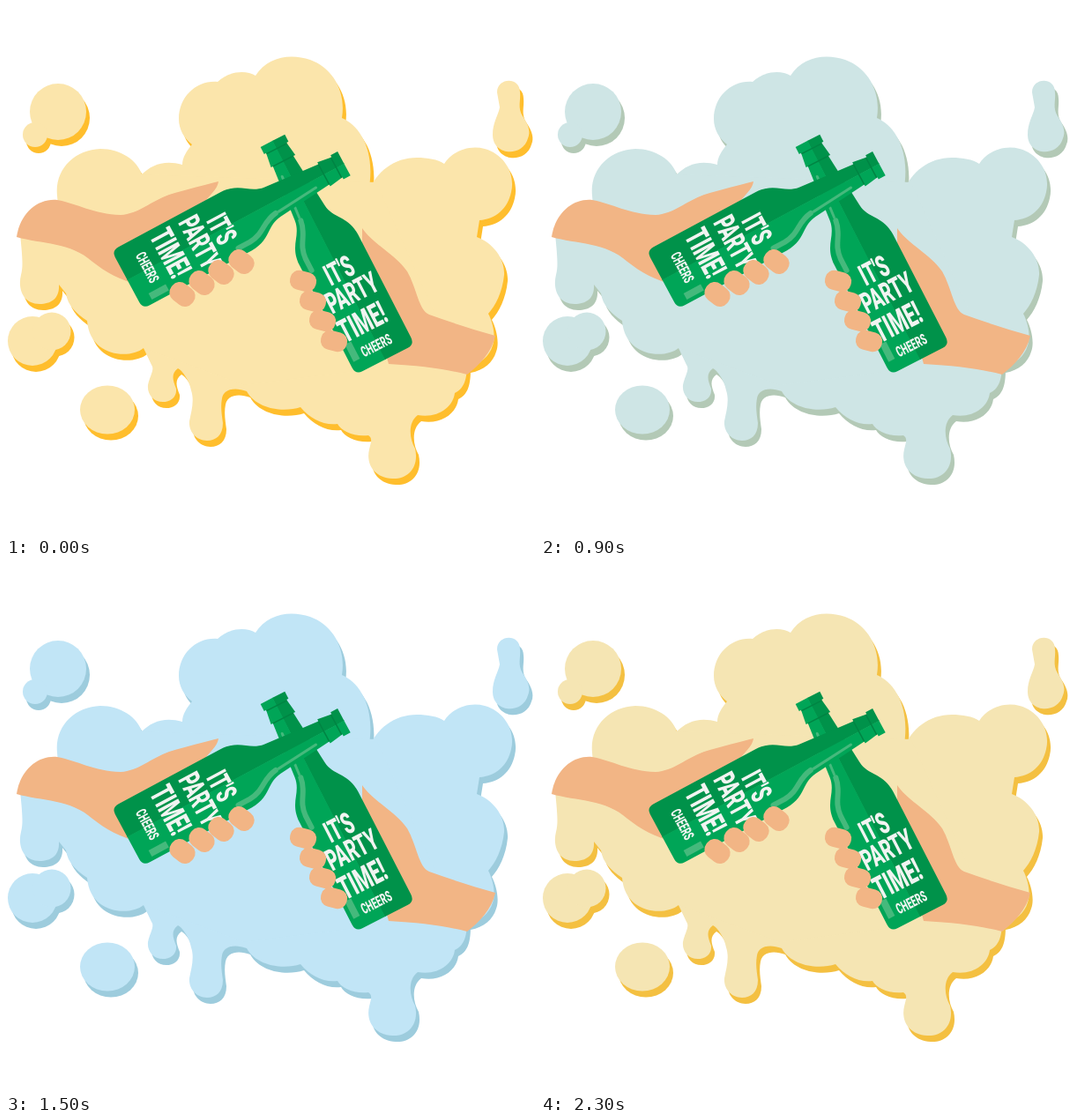
Recreate the animation shown at these times as an HTML page. Size 600 px wide and 600 px high, loop 2400 ms.

```html
<!DOCTYPE html>
<html lang="en">
<head>
<meta charset="utf-8">
<title>Party time</title>
<style>
  html, body { margin: 0; width: 100%; height: 100%; overflow: hidden; background: #fff; }
  svg { display: block; width: 100%; height: 100%; }
  .label { font-family: Roboto, "Liberation Sans", sans-serif; font-weight: 900; fill: #f1f4f1; }
  .skin { fill: #f2b585; }
</style>
</head>
<body>
<svg viewBox="0 0 600 600">
  <defs>
    <g id="foam">
      <path d="M196 128C196 103 216 84 240 86C252 74 272 72 283 79C296 58 322 53 345 61
        C370 70 386 96 381 127C402 136 420 165 411 211C420 188 440 172 466 172C478 172 490 174 497 179
        C506 165 525 157 543 162C565 168 578 190 573 211C569 230 555 242 537 243L534 262
        C553 269 566 287 565 305C563 325 555 340 547 349C552 358 556 375 552 385
        C548 398 538 406 523 409L300 320L154 191C165 180 180 174 200 180
        C200 172 205 164 211 157C202 150 196 140 196 128Z"/>
      <path d="M523 405C523 425 519 434 509 439C507 455 490 468 467 464C456 472 457 490 464 502
        C469 524 455 537 438 536C418 535 408 520 412 503C414 495 416 490 411 487
        C395 489 380 482 376 474C360 476 345 468 334 455C315 461 285 458 273 437
        C260 432 247 434 245 445C243 455 245 465 246 473C246 487 238 493 228 493
        C216 493 207 483 208 471C210 460 214 448 210 436C208 425 200 413 195 411
        C187 417 189 424 193 434C194 444 186 449 178 449C167 449 160 440 161 430
        C163 420 169 412 165 407L156 388L300 250Z"/>
      <path d="M156 388C140 401 95 398 92 357C80 349 70 340 68 326L60 316
        C61 331 52 338 38 338C20 338 13 322 17 305C20 295 18 280 16 258L60 238L58 215
        C55 185 78 163 107 162C130 162 149 175 154 191L420 200L510 400L270 430Z"/>
      <circle cx="59" cy="120" r="32"/><circle cx="33" cy="146" r="14"/>
      <path d="M557 98C557 81 583 80 583 98C584 108 580 115 586 125C593 135 595 143 592 150
        C586 172 552 170 552 146C552 132 558 125 560 115Z"/>
      <circle cx="30" cy="380" r="28"/><circle cx="52" cy="369" r="21.5"/>
      <ellipse cx="115" cy="458" rx="31" ry="27.5"/>
    </g>
    <path id="half" d="M0 0H29Q37.5 0 37.5 -9V-140C37 -165 21 -168 19 -187L13 -253H15.5L13 -270H15.5V-279H0Z"/>
    <g id="glass">
      <use href="#half" fill="#00a557" transform="scale(-1 1)"/>
      <path d="M-.5 0H1V-279H-.5Z" fill="#00a557"/>
      <use href="#half" fill="#00924a"/>
      <path d="M-13 -269H13M-13 -253H13" stroke="#008443" stroke-width="1.5"/>
      <g fill="none" stroke="#45b97c" stroke-linecap="round">
        <path d="M-28 -128V-143C-27 -162 -15 -166 -13 -184" stroke-width="6"/>
        <path d="M-13 -188L-9 -238" stroke-width="3"/>
        <path d="M-29 -14V-36" stroke-width="8" stroke-linecap="butt"/>
      </g>
    </g>
  </defs>

  <use id="shade" href="#foam" x="4" y="7"/>
  <use id="light" href="#foam"/>

  <path class="skin" d="M12 262C16 236 35 218 58 220C80 224 100 236 130 237C150 236 165 221 185 214
    C205 208 225 203 241 199C240 208 230 215 226 222L150 316C130 311 113 302 98 290C74 268 40 270 12 262Z"/>
  <path class="skin" d="M404 252C416 270 440 280 455 301C466 320 468 345 480 350C505 359 530 367 555 374
    C551 393 537 407 523 418C495 411 470 408 434 406L404 300Z"/>
  <g id="bottles"></g>
  <g id="fingers" class="skin"></g>
</svg>
<script>
  const $ = id => document.getElementById(id);

  const words = [["IT'S", -17, -102, 34], ["PARTY", -30, -73, 34], ["TIME!", -32, -37, 37], ["CHEERS", -20, -13, 17]];

  function bottle(x, y, angle, flip, lift) {
    const lines = words.map(([word, wx, wy, size]) =>
      `<text class="label" font-size="${size}" transform="translate(${wx} ${wy - lift}) scale(.58 1)">${word}</text>`);
    return `<g transform="translate(${x} ${y}) rotate(${angle})">
      <use href="#glass" transform="scale(${flip} 1)"/>${lines.join("")}</g>`;
  }

  function finger(x, y, w, h, angle) {
    return `<rect x="${-w / 2}" y="${-h / 2}" width="${w}" height="${h}" rx="${h / 2 - 1}"
      transform="translate(${x} ${y}) rotate(${angle})"/>`;
  }

  $("bottles").innerHTML = bottle(430, 401, -27.2, 1, 0) + bottle(137.5, 310.5, 61.8, -1, 8);

  const leftTips = [[267, 290], [244, 302], [222, 314], [200, 327]];
  const rightTips = [[337, 312], [348, 335], [359, 357], [372, 380]];
  $("fingers").innerHTML =
    leftTips.map(([x, y]) => finger(x, y, 30, 23, 38)).join("") +
    rightTips.map(([x, y]) => finger(x, y, 30, 22, 14)).join("");

  const mix = (a, b, k) => `rgb(${a.map((v, i) => Math.round(v + (b[i] - v) * k))})`;
  const beer = { light: [251, 229, 171], shade: [255, 190, 45] };
  const ice = { light: [186, 229, 254], shade: [146, 206, 240] };

  // Tenths of the fade, one step per 100 ms, with a 300 ms hold at each end.
  function blend(ms) {
    const step = Math.floor((ms % 2400) / 100);
    if (step < 12) return Math.max(0, step - 2) / 10;
    return 1 - Math.max(0, step - 14) / 10;
  }

  function draw(ms) {
    const k = blend(ms);
    for (const part of ["light", "shade"]) $(part).setAttribute("fill", mix(beer[part], ice[part], k));
  }

  const start = performance.now();
  function tick() {
    draw(performance.now() - start);
    requestAnimationFrame(tick);
  }
  tick();
</script>
</body>
</html>
```
